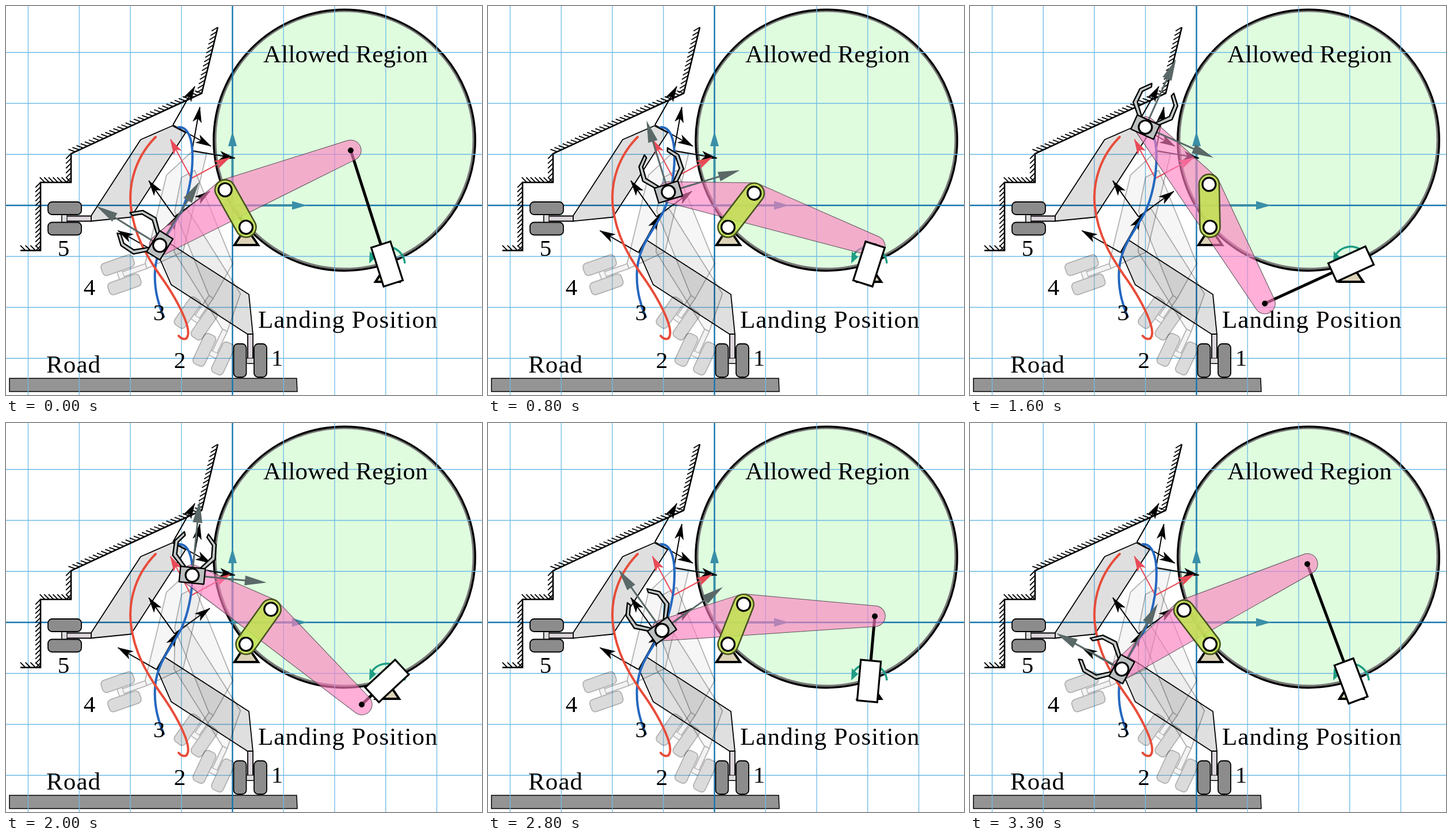
Recreate the animation shown at these times as an HTML page. Size 827x677 px, loop 3.5 s.

```html
<!DOCTYPE html>
<html lang="en">
<head>
<meta charset="utf-8">
<title>Landing gear linkage</title>
<style>
  html, body { margin: 0; width: 100%; height: 100%; overflow: hidden; background: #fff; }
  svg { display: block; width: 827px; height: 677px; }
  text { font: 43px "Liberation Serif", "Times New Roman", serif; letter-spacing: 1.1px; }
  .num { font-size: 41px; letter-spacing: 0; text-anchor: middle; }
  .line { fill: none; }
  .ink { stroke: #000; }
  .ghost { opacity: .3; }
  .pin { fill: #fff; stroke: #000; stroke-width: 3.2; }
  .mount { fill: #ddd3b8; stroke: #000; stroke-width: 4; }
</style>
</head>
<body>
<svg viewBox="0 0 827 677">
  <defs>
    <marker id="stealth" markerUnits="userSpaceOnUse" markerWidth="30" markerHeight="20"
            refX="27" refY="10" orient="auto" viewBox="0 0 30 20">
      <path d="M0 2 L28 10 L0 18 L7 10 Z" fill="context-stroke"/>
    </marker>
    <!-- leg coordinates are relative to the middle of the wheel pair -->
    <g id="leg" stroke="#000" stroke-width="1.8" stroke-linejoin="round">
      <path d="M-149.5 -210 L-2.5 -115 L4.5 -45 L-5 -46 L-137.5 -132 L-161.5 -187 Z"
            fill-opacity=".125"/>
      <rect x="-4.5" y="-46" width="9" height="51" fill="#ddd6dc"/>
      <rect x="-7" y="-4" width="14" height="9" fill="#ddd" stroke-width="1.2"/>
      <rect x="-29" y="-29" width="22" height="58" rx="7" fill="#8c8c8c"/>
      <rect x="6.5" y="-29" width="22" height="58" rx="7" fill="#8c8c8c"/>
    </g>
    <g id="triad" fill="none" stroke-width="2">
      <path d="M0 0 L-67 -38" marker-end="url(#stealth)"/>
      <path d="M0 0 L37 -66" marker-end="url(#stealth)"/>
    </g>
    <path id="claw" d="M19 -12 L37 -31 L36 -57 L21 -74 L19 -68 L30 -55 L30.5 -34 L13 -14 Z"/>
  </defs>

  <circle cx="588" cy="233.5" r="227" fill="#dffcdf"/>
  <circle cx="588" cy="233" r="224.5" class="line" stroke="#777" stroke-width="4"/>
  <circle cx="588" cy="233.5" r="227.2" class="line ink" stroke-width="3.4"/>
  <path d="M6 648 H505 L506 671 H6 Z" fill="#949494" stroke="#000" stroke-width="1.5"/>

  <path id="grid" class="line" stroke="#6ebbe6" stroke-width="1.3"/>
  <path d="M393.5 0 V677 M0 347 H827" class="line" stroke="#1576b0" stroke-width="2.4"/>
  <g fill="#3a8fa8" stroke="#3a8fa8">
    <path d="M393.5 347 V240 M393.5 347 H500" stroke-width="4"/>
    <path d="M393.5 218 L386 244 H401 Z M523 347 L497 339.5 V354.5 Z" stroke="none"/>
  </g>

  <path id="wall" class="line ink" stroke-width="2.6"/>
  <path id="hatch" class="line ink" stroke-width="1.8"/>

  <g id="legs"></g>
  <use href="#triad" transform="translate(322 300) rotate(32.3)" stroke="#e84a57"/>

  <g class="line" stroke-width="4" stroke-linecap="round">
    <path stroke="#2468c0" d="M300 211 C318 210 324 235 324 262 C324 300 315 335 305 357
      C290 388 262 415 259 460 C257 490 264 518 274 541"/>
    <path stroke="#e84c3a" d="M260 228 C228 260 212 305 217 350 C223 400 245 436 267 468
      C296 508 320 555 316 573 C314 583 305 580 300 574"/>
  </g>

  <text x="447" y="97.5" style="letter-spacing:.2px">Allowed Region</text>
  <text x="438" y="560">Landing Position</text>
  <text x="70" y="638">Road</text>
  <text class="num" x="471" y="626">1</text>
  <text class="num" x="302" y="630">2</text>
  <text class="num" x="266" y="547">3</text>
  <text class="num" x="145" y="503">4</text>
  <text class="num" x="100" y="435">5</text>

  <path class="mount" d="M417 385 L397 416 H438 Z"/>
  <path class="mount" d="M662 449 L642 480 H683 Z"/>
  <path class="line" d="M693 448 A31.5 31.5 0 0 0 636 432" stroke="#1f9e84" stroke-width="3.5"/>
  <path d="M631 448 L632 427 L643 437 Z" fill="#1f9e84"/>

  <line id="rod" x2="662" y2="449" stroke="#000" stroke-width="5"/>

  <!-- coupler: origin at the crank pin, x axis along gripper to rod end -->
  <g id="coupler">
    <path d="M-148.9 18.4 L-4.3 -17.5 A18 18 0 0 1 2.8 -17.8 L228.8 18.1
      A18 18 0 0 1 226 53.9 H-144.6 A18 18 0 0 1 -148.9 18.4 Z"
      fill="#ff7ec0" fill-opacity=".62" stroke="#333" stroke-opacity=".8"/>
    <circle cx="226" cy="35.9" r="5"/>
    <g transform="translate(-144.6 35.9) rotate(-31.7)">
      <g fill="#5a6868" stroke="#5a6868">
        <path d="M0 0 H94 M0 0 V-94" stroke-width="3"/>
        <path d="M130 0 L92 -8.5 V8.5 Z M0 -130 L-8.5 -92 H8.5 Z" stroke="none"/>
      </g>
      <g fill="#c3c8c8" stroke="#000" stroke-width="2.4" stroke-linejoin="round">
        <use href="#claw"/>
        <use href="#claw" transform="scale(-1 1)"/>
        <rect x="-21.5" y="-13.5" width="43" height="27" fill="#bcc0c1"/>
      </g>
      <circle class="pin" r="11.5"/>
    </g>
  </g>

  <g id="crank" transform="translate(417 385)">
    <rect x="-17.5" y="-17.5" width="109.6" height="35" rx="17.5"
          fill="#c2e155" fill-opacity=".9" stroke="#46531f" stroke-width="2.6"/>
    <circle class="pin" r="11.5"/>
    <circle class="pin" cx="74.6" r="11.5"/>
  </g>

  <rect id="cylinder" x="-35.5" y="-17.5" width="71" height="35"
        fill="#fff" stroke="#000" stroke-width="3.2"/>
</svg>

<script>
  const el = id => document.getElementById(id);
  const RAD = Math.PI / 180;

  // Static parts built by rule
  let grid = '';
  for (let i = -4; i <= 4; i++) {
    if (!i) continue;
    grid += `M${393.5 + i * 88.75} 0V677`;
    if (i < 4 && i > -4) grid += `M0 ${347 + i * 88.75}H827`;
  }
  el('grid').setAttribute('d', grid);

  const wall = [[25, 425.5], [60, 425.5], [60, 307], [113, 307], [113, 257], [340, 152], [368, 37]];
  el('wall').setAttribute('d', 'M' + wall.join('L'));
  let hatch = '';
  wall.slice(1).forEach(([x2, y2], i) => {
    const [x1, y1] = wall[i];
    const len = Math.hypot(x2 - x1, y2 - y1);
    const dir = Math.atan2(y2 - y1, x2 - x1) - 135 * RAD;
    const n = Math.round(len / 7.8);
    for (let j = 1; j <= n; j++) {
      const x = x1 + (x2 - x1) * j / n, y = y1 + (y2 - y1) * j / n;
      hatch += `M${x} ${y}l${12.5 * Math.cos(dir)} ${12.5 * Math.sin(dir)}`;
    }
  });
  el('hatch').setAttribute('d', hatch);

  // x, y, rotation, ghosted, with axes
  const poses = [
    [330, 544, 35, 1, 0], [361, 606, 25, 1, 1], [200, 468, 70.6, 1, 1],
    [424.5, 617, 0, 0, 1], [102, 370, 90, 0, 1]
  ];
  el('legs').innerHTML = poses.map(([x, y, r, ghost, axes]) =>
    `<g transform="translate(${x} ${y}) rotate(${r})">
      <use href="#leg" class="${ghost ? 'ghost' : ''}"/>
      ${axes ? '<use href="#triad" x="-163" y="-188" stroke="#000"/>' : ''}
    </g>`).join('');

  // Crank angle against coupler tilt, in degrees
  const knots = [
    [-29.55, 127.3], [-26.4, 119], [-16, 92.5], [-5, 70.4], [5, 59.2], [15, 52.4],
    [25, 50.4], [36.3, 53.9], [45.5, 62.7], [50.65, 71.5], [55.8, 90.8]
  ];
  const slope = (a, b) => (knots[b][1] - knots[a][1]) / (knots[b][0] - knots[a][0]);

  function crankAngle(tilt) {
    const last = knots.length - 1;
    let i = 0;
    while (i < last - 1 && tilt > knots[i + 1][0]) i++;
    const [x0, y0] = knots[i], [x1, y1] = knots[i + 1];
    const w = x1 - x0, s = (tilt - x0) / w;
    const m0 = slope(Math.max(i - 1, 0), i + 1) * w;
    const m1 = slope(i, Math.min(i + 2, last)) * w;
    return y0 + s * (m0 + s * (3 * (y1 - y0) - 2 * m0 - m1 + s * (2 * (y0 - y1) + m0 + m1)));
  }

  function pose(step) {
    const phase = (step + 0.8) % 34;
    const tilt = -30.6 + 5.15 * Math.min(phase, 34 - phase);
    const crank = -crankAngle(tilt);
    const bx = 417 + 74.6 * Math.cos(crank * RAD);
    const by = 385 + 74.6 * Math.sin(crank * RAD);
    const c = Math.cos(tilt * RAD), s = Math.sin(tilt * RAD);
    const px = bx + 226 * c - 35.9 * s;
    const py = by + 226 * s + 35.9 * c;
    const aim = Math.atan2(py - 449, px - 662) / RAD;

    el('crank').setAttribute('transform', `translate(417 385) rotate(${crank})`);
    el('coupler').setAttribute('transform', `translate(${bx} ${by}) rotate(${tilt})`);
    el('rod').setAttribute('x1', px);
    el('rod').setAttribute('y1', py);
    el('cylinder').setAttribute('transform', `translate(662 449) rotate(${aim})`);
  }

  // Moves in tenths of a second; the last pose is held twice as long
  const start = performance.now();
  function tick() {
    const t = Math.max(0, performance.now() - start) % 3500;
    pose(Math.min(33, Math.floor(t / 100)));
    requestAnimationFrame(tick);
  }
  tick();
</script>
</body>
</html>
```
